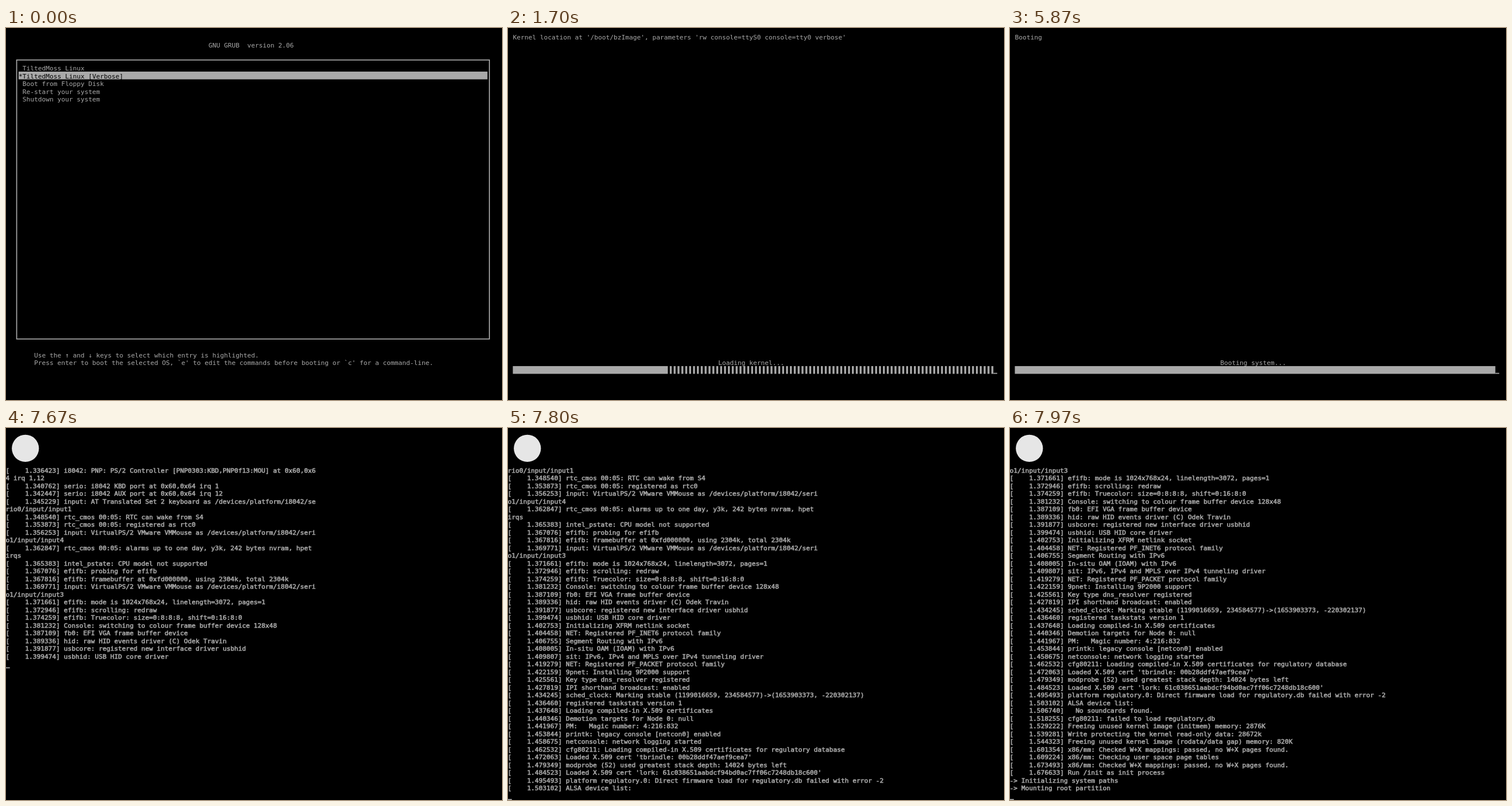
Animation, 864 px wide and 648 px high, one loop 8 s. Source, as an HTML page with a canvas:

```html
<!DOCTYPE html>
<html lang="en">
<head>
<meta charset="utf-8">
<title>Boot sequence</title>
<style>
html, body { margin: 0; height: 100%; overflow: hidden; background: #000; }
canvas { display: block; }
</style>
</head>
<body>
<canvas id="stage" width="864" height="648"></canvas>
<script>
const ctx = document.getElementById("stage").getContext("2d");
const LOOP = 8000, GREY = "#a9a9a9";
const CELL_W = 8, CELL_H = 16, COLS = 124; // text cells of a 1024 x 768 screen

const log = `1.336423 i8042: PNP: PS/2 Controller [PNP0303:KBD,PNP0f13:MOU] at 0x60,0x6
4 irq 1,12
1.340762 serio: i8042 KBD port at 0x60,0x64 irq 1
1.342447 serio: i8042 AUX port at 0x60,0x64 irq 12
1.345229 input: AT Translated Set 2 keyboard as /devices/platform/i8042/se
rio0/input/input1
1.348540 rtc_cmos 00:05: RTC can wake from S4
1.353873 rtc_cmos 00:05: registered as rtc0
1.356253 input: VirtualPS/2 VMware VMMouse as /devices/platform/i8042/seri
o1/input/input4
1.362847 rtc_cmos 00:05: alarms up to one day, y3k, 242 bytes nvram, hpet
irqs
1.365383 intel_pstate: CPU model not supported
1.367076 efifb: probing for efifb
1.367816 efifb: framebuffer at 0xfd000000, using 2304k, total 2304k
1.369771 input: VirtualPS/2 VMware VMMouse as /devices/platform/i8042/seri
o1/input/input3
1.371661 efifb: mode is 1024x768x24, linelength=3072, pages=1
1.372946 efifb: scrolling: redraw
1.374259 efifb: Truecolor: size=0:8:8:8, shift=0:16:8:0
1.381232 Console: switching to colour frame buffer device 128x48
1.387109 fb0: EFI VGA frame buffer device
1.389336 hid: raw HID events driver (C) Odek Travin
1.391877 usbcore: registered new interface driver usbhid
1.399474 usbhid: USB HID core driver
1.402753 Initializing XFRM netlink socket
1.404458 NET: Registered PF_INET6 protocol family
1.406755 Segment Routing with IPv6
1.408005 In-situ OAM (IOAM) with IPv6
1.409807 sit: IPv6, IPv4 and MPLS over IPv4 tunneling driver
1.419279 NET: Registered PF_PACKET protocol family
1.422159 9pnet: Installing 9P2000 support
1.425561 Key type dns_resolver registered
1.427819 IPI shorthand broadcast: enabled
1.434245 sched_clock: Marking stable (1199016659, 234584577)->(1653903373, -220302137)
1.436460 registered taskstats version 1
1.437648 Loading compiled-in X.509 certificates
1.440346 Demotion targets for Node 0: null
1.441967 PM:   Magic number: 4:216:832
1.453844 printk: legacy console [netcon0] enabled
1.458675 netconsole: network logging started
1.462532 cfg80211: Loading compiled-in X.509 certificates for regulatory database
1.472063 Loaded X.509 cert 'tbrindle: 00b28ddf47aef9cea7'
1.479349 modprobe (52) used greatest stack depth: 14024 bytes left
1.484523 Loaded X.509 cert 'lork: 61c038651aabdcf94bd0ac7ff06c7248db18c600'
1.495493 platform regulatory.0: Direct firmware load for regulatory.db failed with error -2
1.503102 ALSA device list:
1.506740   No soundcards found.
1.518255 cfg80211: failed to load regulatory.db
1.529222 Freeing unused kernel image (initmem) memory: 2876K
1.539281 Write protecting the kernel read-only data: 28672k
1.544323 Freeing unused kernel image (rodata/data gap) memory: 820K
1.601354 x86/mm: Checked W+X mappings: passed, no W+X pages found.
1.609224 x86/mm: Checking user space page tables
1.673493 x86/mm: Checked W+X mappings: passed, no W+X pages found.
1.676633 Run /init as init process
-> Initializing system paths
-> Mounting root partition`
  .split("\n").map(line => line.replace(/^(\d\.\d{6}) /, "[    $1] "));

// Log lines printed at each screen refresh
const printed = [25, 34, 42, 45, 47, 49, 52, 53, 54, 58];

const stages = [
  { start: 1400, end: 1700, steps: 9, filled: 40, label: "Loading kernel...",
    head: "Kernel location at '/boot/bzImage', parameters 'rw console=ttyS0 console=tty0 verbose'" },
  { start: 5130, end: 5300, steps: 6, filled: 83, label: "Loading initial ramdisk...",
    head: "InitRD location at '/boot/init.cpio.zst'" },
  { start: 5600, end: 5870, steps: 7, filled: COLS, label: "Booting system...", head: "Booting" },
];

// Index of the screen refresh at time t; the margin absorbs uneven refresh intervals
function stepAt(t, start, end, steps) {
  const k = Math.floor((t - start) / (end - start) * (steps - 1) + 0.25);
  return Math.min(steps - 1, Math.max(0, k));
}

function block(col, row, cols) {
  ctx.fillStyle = GREY;
  ctx.fillRect(col * CELL_W, row * CELL_H, cols * CELL_W, CELL_H);
}

function cursor(col, row) {
  ctx.fillStyle = GREY;
  ctx.fillRect(col * CELL_W, row * CELL_H + 14, CELL_W, 2);
}

function print(text, col, row, { color = GREY, dx = 0, baseline = 14, heavy = false } = {}) {
  ctx.fillStyle = ctx.strokeStyle = color;
  [...text].forEach((char, i) => {
    if (char === " ") return;
    const x = (col + i) * CELL_W + dx, y = row * CELL_H + baseline;
    ctx.fillText(char, x, y);
    if (heavy) ctx.strokeText(char, x, y);
  });
}

function drawMenu() {
  print("GNU GRUB  version 2.06", 51, 1);
  ctx.strokeStyle = GREY;
  ctx.lineWidth = 2;
  ctx.strokeRect(12, 56, 122 * CELL_W, 36 * CELL_H);
  const entries = ["TiltedMoss Linux", "TiltedMoss Linux [Verbose]", "Boot from Floppy Disk",
    "Re-start your system", "Shutdown your system"];
  entries.forEach((entry, i) => {
    if (i === 1) {
      block(2, 5, 121);
      print("*" + entry, 2, 5, { color: "#000" });
    } else print(entry, 3, 4 + i);
  });
  print("Use the ↑ and ↓ keys to select which entry is highlighted.", 6, 41);
  print("Press enter to boot the selected OS, `e' to edit the commands before booting or `c' for a command-line.", 6, 42);
}

function drawLoading(t, { start, end, steps, filled, label, head }) {
  const left = steps - 1 - stepAt(t, start, end, steps);
  const drawn = Math.round(COLS - left * 4.2);
  print(head, 0, 0);
  print(label, Math.floor((COLS - label.length) / 2), 42);
  block(0, 43, Math.min(filled, drawn));
  for (let col = filled; col < drawn; col++) block(col + 0.5, 43, 0.5);
  cursor(drawn, 43);
}

function drawLog(t) {
  const count = printed[stepAt(t, 7670, 7970, printed.length)];
  const lines = log.slice(Math.max(0, count - 42), count);
  ctx.fillStyle = "#e6e6e6";
  ctx.beginPath();
  ctx.arc(40, 42, 28, 0, 2 * Math.PI);
  ctx.fill();
  ctx.lineWidth = 0.7;
  lines.forEach((line, i) => print(line, 0, 5 + i, { dx: -0.5, baseline: 12, heavy: true }));
  cursor(0, 5 + lines.length);
}

function draw() {
  const t = performance.now() % LOOP;
  ctx.setTransform(1, 0, 0, 1, 0, 0);
  ctx.fillStyle = "#000";
  ctx.fillRect(0, 0, 864, 648);
  ctx.scale(864 / 1024, 648 / 768);
  ctx.font = "13.3px 'DejaVu Sans Mono', monospace";
  if (t >= 7665) drawLog(t);
  else {
    ctx.translate(10, 10); // boot loader screen margin
    const stage = stages.findLast(s => t >= s.start);
    if (stage) drawLoading(t, stage);
    else drawMenu();
  }
  requestAnimationFrame(draw);
}
draw();
</script>
</body>
</html>
```
